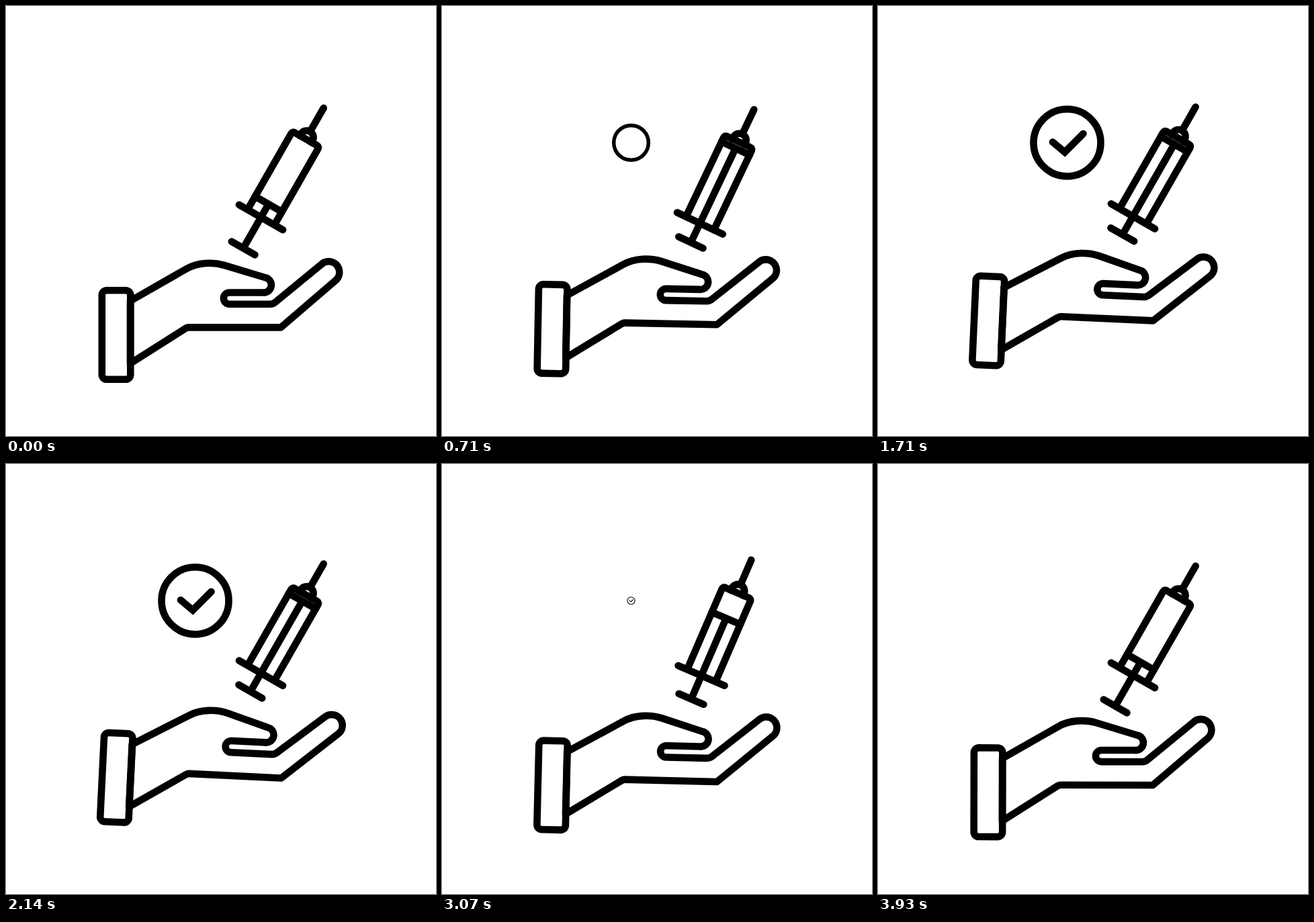
Write an HTML page that moves like this. It is 640 px wide and 640 px high and loops after 4 s.

```html
<!DOCTYPE html>
<html lang="en">
<head>
<meta charset="utf-8">
<title>Vaccination</title>
<style>
  html, body { margin: 0; height: 100%; overflow: hidden; background: #fff; }
  svg { display: block; width: 100%; height: 100%; }
</style>
</head>
<body>
<svg viewBox="0 0 640 640" fill="none" stroke="#000" stroke-width="10.6" stroke-linecap="round" stroke-linejoin="round">
  <g id="hand">
    <rect x="142.8" y="423.3" width="42.5" height="132.4" rx="7"/>
    <path d="M185 439L268 391.5C285 381.5 308 380.8 325 385.8L385 404A11.3 11.3 0 0 1 382 426.5H332.5A8.6 8.6 0 0 0 332.5 443.7H393
      Q397 443.7 400 441.5L470.2 383.8Q474 380.2 480.5 380.2A16 16 0 0 1 490.8 408.2L409 478.4H272Q269.5 478.4 267 480L185 532Z"/>
  </g>
  <g id="syringe">
    <g transform="translate(379.5 314.5) rotate(29.8)">
      <path d="M-37.5 0H37.5M-23 0V-130Q-23 -134.3 -19 -134.3H19Q23 -134.3 23 -130V0"/>
      <path d="M-10 -134V-137A10 10 0 0 1 10 -137V-134M0 -150V-187.5"/>
      <path id="plunger"/>
    </g>
  </g>
  <g id="badge">
    <circle r="50"/>
    <path id="check" d="M-21.5 -1L-3.5 14L24 -13.5" stroke-linejoin="miter" pathLength="1"/>
  </g>
</svg>
<script>
const LOOP = 4000, FPS = 14;
const $ = id => document.getElementById(id);

// ramp: 0 to 1 between two times; hop: 0 to 1 and back to 0.
const ramp = (t, from, to) => Math.min(1, Math.max(0, (t - from) / (to - from)));
const hop = (t, from, peak, to) => ramp(t, from, peak) - ramp(t, peak, to);

function render(t) {
  const handTilt = 3 * hop(t, 0, LOOP / 2, LOOP);
  $('hand').setAttribute('transform', `rotate(${handTilt} 632 484)`);

  const rise = hop(t, 0, 350, 600) + hop(t, 800, 1000, 1800)
             + hop(t, 2000, 2640, 3150) + hop(t, 3070, 3200, 3930);
  const y = 7 * hop(t, 600, 714, 800) - 14.5 * rise;
  const tilt = -10 * hop(t, 0, 350, 1000) - 6.5 * hop(t, 2700, 3070, 3350);
  $('syringe').setAttribute('transform', `translate(0 ${y}) rotate(${tilt} 408 258)`);

  const pressed = ramp(t, 300, 650) - ramp(t, 2950, 3350);
  const seal = -22.6 - 101 * pressed, grip = 53 - 21.5 * pressed;
  $('plunger').setAttribute('d', `M-23 ${seal}H23M0 ${seal}V${grip}M-20 ${grip}H20`);

  const scale = ramp(t, 500, 915) - ramp(t, 2640, 3125);
  $('badge').style.display = scale > 0 ? '' : 'none';
  $('badge').setAttribute('transform', `translate(281.5 203.5) scale(${scale})`);

  const drawn = ramp(t, 850, 1150);
  $('check').style.display = drawn > 0 ? '' : 'none';
  $('check').setAttribute('stroke-dasharray', `${drawn} 2`);
}

const start = performance.now();
function tick() {
  const t = (performance.now() - start) % LOOP;
  const step = Math.floor((t + 5) * FPS / 1000);
  render(step * 1000 / FPS % LOOP);
  requestAnimationFrame(tick);
}
tick();
</script>
</body>
</html>
```
